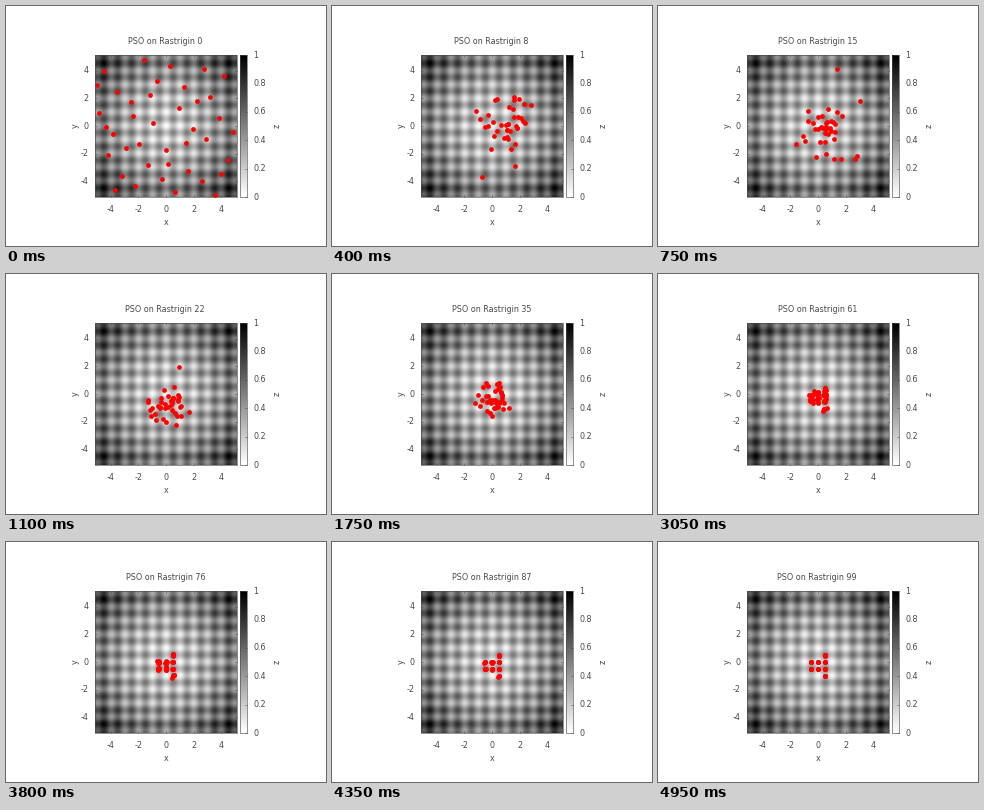
A matplotlib script that plays this animation: 320 px wide and 240 px high, repeating every 5 s.

```python
import numpy as np
import matplotlib.pyplot as plt
from matplotlib.animation import FuncAnimation
from matplotlib.patches import Rectangle

W, H, DPI = 320, 240, 100
PX = 72 / DPI                      # points per pixel
FRAMES, INTERVAL = 100, 50
LEFT, RIGHT, TOP, BOTTOM = 89, 231, 49, 191
BAR_L, BAR_R = 234, 241
LIMIT = 5.12
CX, CY = (LEFT + RIGHT) / 2, (TOP + BOTTOM) / 2
UNIT = (RIGHT - LEFT) / (2 * LIMIT)
INK = "#4a4a4a"

# Swarm settings
COUNT = 40
INERTIA = 0.9
WELLS = np.array([(-1, 0), (-1, -1), (0, 0), (0, -1),
                  (1, 1), (1, 0), (1, -1), (1, -2)], float)


def halton(i, base):
    value, scale = 0, 1
    while i:
        scale /= base
        value += scale * (i % base)
        i //= base
    return value


def leader(n):
    """Best place known to the whole swarm at step n."""
    if n < 10:
        return np.array([1.2, 0.2])
    return np.array([0.0, -1.0]) if n < 23 else np.zeros(2)


def fly():
    """Swarm without random pulls: each particle settles halfway
    between its own best place and the leader."""
    rng = np.random.default_rng(11)
    unit = np.array([[halton(i, 2), halton(i, 3)] for i in range(1, COUNT + 1)])
    x = start = (2 * unit - 1) * LIMIT
    v = rng.normal(0, 1, x.shape)
    well = WELLS[(unit[:, 0] * len(WELLS)).astype(int)]
    found = rng.integers(2, 15, (COUNT, 1))
    pull = rng.uniform(0.4, 0.7, (COUNT, 1))
    path = [x]
    for n in range(FRAMES - 1):
        best = np.where(n < found, start, well)
        v = INERTIA * v + pull * (best - x) + pull * (leader(n) - x)
        x = np.clip(x + v, -LIMIT, LIMIT)
        path.append(x)
    return np.array(path)


def rastrigin(x, y):
    return 20 + x**2 + y**2 - 10 * (np.cos(2 * np.pi * x) + np.cos(2 * np.pi * y))


fig = plt.figure(figsize=(W / DPI, H / DPI), dpi=DPI, facecolor="white")
plt.rcParams["font.family"] = "DejaVu Sans"
ax = fig.add_axes([0, 0, 1, 1])
ax.axis("off")


def picture(values, left, right):
    ax.imshow(values, cmap="gray_r", vmin=0, vmax=1, aspect="auto",
              extent=(left, right, BOTTOM, TOP), interpolation="bilinear")


def label(x, y, text, **kw):
    kw = {"ha": "center", "va": "baseline", **kw}
    return ax.text(x, y, text, fontsize=8.05 * PX, color=INK, **kw)


def tick(x, y, dx, dy):
    ax.plot([x, x + dx], [y, y + dy], color=INK, lw=0.5 * PX, zorder=4)


def frame(left, right):
    ax.add_patch(Rectangle((left, TOP), right - left, BOTTOM - TOP, fill=False,
                           ec=INK, lw=0.6 * PX, zorder=4))


# Each cell takes the value at its lower left corner.
grid = np.arange(-LIMIT, LIMIT, 0.1)
field = rastrigin(*np.meshgrid(grid, grid[::-1]))
picture(field / field.max(), LEFT, RIGHT)
picture(np.linspace(1, 0, 142)[:, None] * np.ones(2), BAR_L, BAR_R)
frame(LEFT, RIGHT)
frame(BAR_L, BAR_R)

for value in range(-4, 5, 2):
    x, y = CX + value * UNIT, CY - value * UNIT
    tick(x, BOTTOM, 0, -2)
    tick(x, TOP, 0, 2)
    tick(LEFT, y, 2, 0)
    tick(RIGHT, y, -2, 0)
    label(x, 206, value)
    label(82.5, y + 2.7, value, ha="right")

for i in range(6):
    y = BOTTOM - i * (BOTTOM - TOP) / 5
    tick(BAR_R, y, -2, 0)
    label(247.5, y + 2.7, f"{i / 5:g}", ha="left")

label(160, 219, "x")
label(69.5, CY, "y", rotation=90, va="center")
label(271.5, CY, "z", rotation=90, va="center")
title = label(159.3, 38.2, "")
dots, = ax.plot([], [], "o", color="red", ms=4.8 * PX, mew=0, zorder=3)
dots.set_snap(False)

ax.set_xlim(0, W)
ax.set_ylim(H, 0)

path = fly()


def update(n):
    x, y = path[n].T
    dots.set_data(CX + x * UNIT, CY - y * UNIT)
    title.set_text(f"PSO on Rastrigin {n}")
    return dots, title


anim = FuncAnimation(fig, update, frames=FRAMES, interval=INTERVAL,
                     repeat=True, repeat_delay=0)
plt.show()
```
